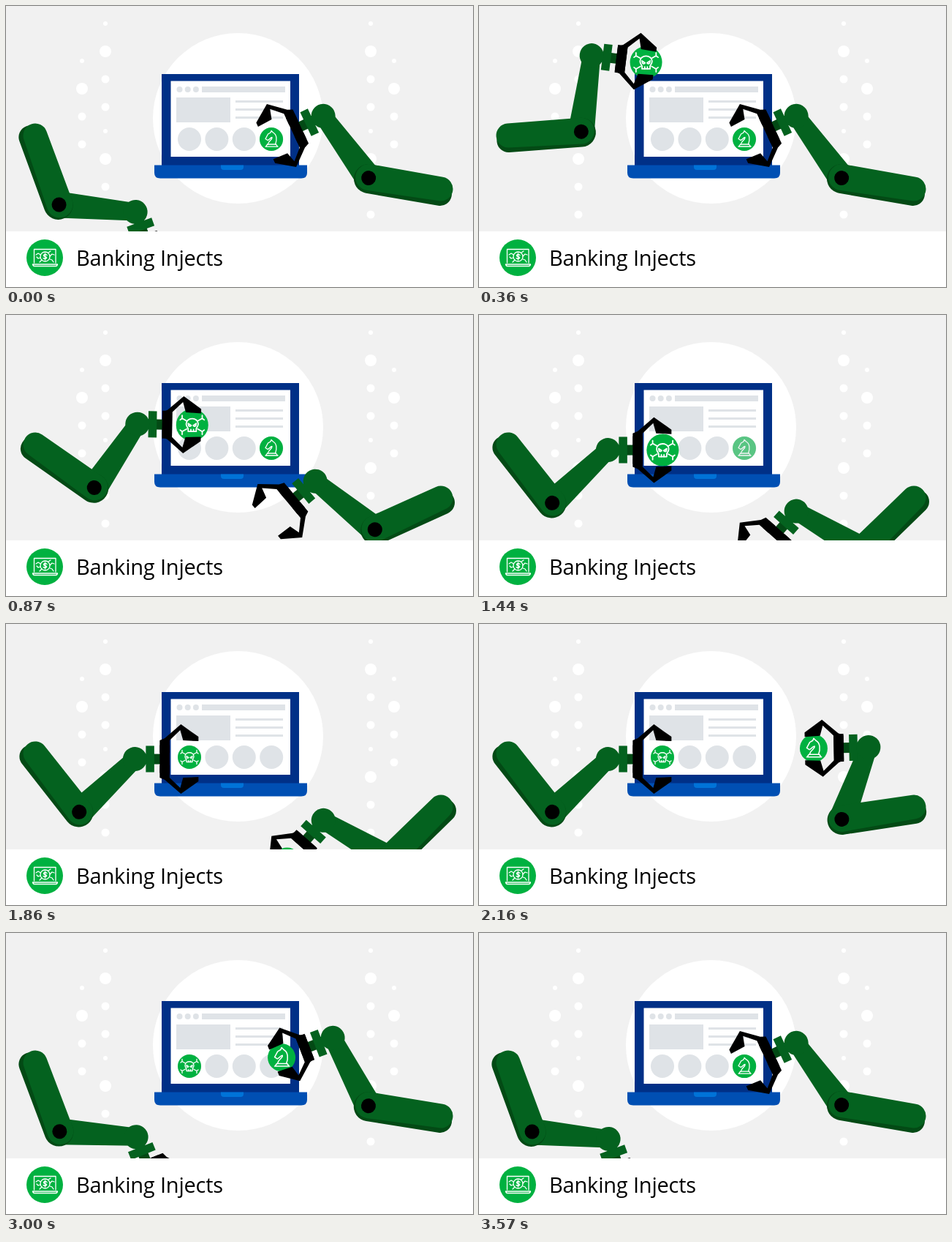
An HTML page for the animation above (3.6 s loop, 639x384 px).

```html
<!DOCTYPE html>
<html lang="en">
<head>
<meta charset="utf-8">
<title>Banking Injects</title>
<style>
  html, body { margin: 0; width: 100%; height: 100%; overflow: hidden; background: #fff; }
  svg { display: block; width: 639px; height: 384px; }
  .line { fill: none; stroke: #fff; stroke-width: 1.3; stroke-linecap: round; stroke-linejoin: round; }
  .label { font: 400 29px "Open Sans", "Noto Sans", sans-serif; font-stretch: 87.5%; letter-spacing: -.2px; }
</style>
</head>
<body>
<svg viewBox="0 0 639 384">
  <rect width="639" height="308" fill="#f1f1f1"/>
  <g id="dots" fill="#fff"></g>
  <circle cx="317.5" cy="153.5" r="116.5" fill="#fff"/>

  <rect x="213" y="93" width="188" height="125" fill="#003087"/>
  <rect x="225.5" y="102.5" width="163.5" height="103.5" fill="#fff"/>
  <path d="M203 217.5H412V228Q412 235.5 404 235.5H211Q203 235.5 203 228Z" fill="#004fb3"/>
  <path d="M294 217.5H325V220Q325 224 321 224H298Q294 224 294 220Z" fill="#0073d8"/>
  <g id="page" fill="#dfe3e7">
    <rect x="268" y="110" width="114" height="8"/>
    <rect x="233" y="125" width="74" height="34"/>
  </g>

  <g id="skull">
    <circle r="16" fill="#00b140"/>
    <g class="line">
      <path d="M-6 -1C-6 -8 6 -8 6 -1C6 2 4 2.5 4 4V6.5H-4V4C-4 2.5 -6 2 -6 -1Z"/>
      <path d="M-4 -1.5L-1 .5Q-2 2 -3.5 1ZM4 -1.5L1 .5Q2 2 3.5 1ZM-1.3 4.5V6.5M1.3 4.5V6.5"/>
      <g id="bones"></g>
    </g>
  </g>
  <g id="knight">
    <circle r="16" fill="#00b140"/>
    <g class="line">
      <path d="M-8 10H9M-5.5 7H6.5L8.5 10M-5.5 7L-7.500 10"/>
      <path d="M-4.5 7C-4.500 2.500 1.500 1 1 -2.500C-1.500 -2.500 -2.500 1 -5 1.500L-8 -.5L-4.5 -7L-1 -9L0 -11.500L2.500 -9C7.500 -6.500 8 1 5.500 7"/>
    </g>
  </g>

  <g id="arms"></g>

  <rect y="308" width="639" height="76" fill="#fff"/>
  <circle cx="53" cy="344" r="25" fill="#00b140"/>
  <g class="line">
    <path d="M38.5 351V332.500H68V351M36.500 353H70.500Q70 355.500 68 355.500H39Q37 355.500 36.500 353Z"/>
    <circle cx="53.500" cy="342.500" r="6.500"/>
    <path d="M56 340.500Q53.500 338.500 51.500 340.500Q51 342 53.500 342.500Q56 343 55.500 344.500Q53.500 346.500 51 344.500M53.500 338V347"/>
    <path d="M47.500 340L44 338L41 340M47 344L44 345L42 343M49 347L46 350M58 337L61 335M60 342L63 339L66 340M60 346L63 347L65 350"/>
  </g>
  <text class="label" x="96" y="355">Banking Injects</text>
</svg>

<script>
const LOOP = 3600, UPPER = 100, FORE = 105, GRIP = 75;
const GREEN = '#04621f', SHADE = '#034a15';
const SLOT_Y = 182, SLOT_R = 16, OPEN = 8.5;

const $ = id => document.getElementById(id);
const rad = deg => deg * Math.PI / 180;
const mix = (a, b, k) => a + (b - a) * k;
const wrap = t => (t + LOOP) % LOOP;
const ramp = (t, a, b) => Math.min(1, Math.max(0, (t - a) / (b - a)));

// Cubic bezier easing (.25, 0, .08, 1), solved by bisection
function ease(p) {
  if (p <= 0 || p >= 1) return p;
  let lo = 0, hi = 1, s = .5;
  for (let i = 0; i < 22; i++) {
    s = (lo + hi) / 2;
    const u = 1 - s;
    if (3 * u * u * s * .25 + 3 * u * s * s * .08 + s * s * s < p) lo = s; else hi = s;
  }
  return s * s * (3 - 2 * s);
}
const glide = (t, a, b) => ease(ramp(t, a, b));

function add(parent, tag, attrs) {
  const el = document.createElementNS('http://www.w3.org/2000/svg', tag);
  for (const k in attrs) el.setAttribute(k, attrs[k]);
  return parent.appendChild(el);
}

// Outline around two circles
function capsule(x1, y1, r1, x2, y2, r2) {
  const a = Math.atan2(y2 - y1, x2 - x1);
  const b = Math.acos((r1 - r2) / Math.hypot(x2 - x1, y2 - y1));
  const at = (x, y, r, q) => `${x + r * Math.cos(q)} ${y + r * Math.sin(q)}`;
  return `M${at(x1, y1, r1, a + b)}A${r1} ${r1} 0 ${+(r1 > r2)} 1 ${at(x1, y1, r1, a - b)}` +
    `L${at(x2, y2, r2, a - b)}A${r2} ${r2} 0 ${+(r2 > r1)} 1 ${at(x2, y2, r2, a + b)}Z`;
}

// An arm that drops its badge into a slot at time `drop`, then fetches a new one
function makeArm({ x, y, side, moves, badge, size, slot, drop }) {
  const root = add($('arms'), 'g', { transform: `translate(${x} ${y}) scale(${side} 1)` });
  const upper = add(root, 'g');
  const fore = add(upper, 'g');
  add(fore, 'path', { d: capsule(0, 0, 18, FORE, 0, 12), fill: GREEN });
  const hand = add(fore, 'g');
  add(hand, 'path', { d: 'M24 -7H36V7H24Z', fill: SHADE });
  add(hand, 'path', { d: 'M10 -7H18V7H10ZM15 -18H26.5V18H15Z', fill: GREEN });
  add(hand, 'path', { d: 'M34 -19H47.5V19H34Z' });
  const fingers = [1, -1].map(flip => add(add(hand, 'g', { transform: `scale(1 ${flip})` }), 'path', {
    d: 'M34 0V-17L41 -20L63 -39L87 -22V-16L66 -17L62 -31L47.5 -17V0Z'
  }));
  add(fore, 'circle', { cx: FORE, r: 16.5, fill: GREEN });
  add(upper, 'path', { d: capsule(0, 7, 16, UPPER, 1, 20), fill: SHADE });
  add(upper, 'path', { d: capsule(0, 0, 16.5, UPPER, -1, 18), fill: GREEN });
  add(upper, 'circle', { cx: UPPER, r: 10 });

  return t => {
    const [a, b, c] = moves.reduce(
      (pose, { from, to, pose: next }) => pose.map((v, i) => mix(v, next[i], glide(t, from, to))),
      moves[moves.length - 1].pose);
    upper.setAttribute('transform', `rotate(${a})`);
    fore.setAttribute('transform', `translate(${UPPER} 0) rotate(${b - a})`);
    hand.setAttribute('transform', `translate(${FORE} 0) rotate(${c - b})`);

    const loose = wrap(t - drop + 140);
    const open = OPEN * (glide(loose, 0, 400) - glide(loose, 1940, 2140));
    fingers.forEach(f => f.setAttribute('transform', `translate(0 ${-open})`));

    const age = wrap(t - drop), stored = age < 2000;
    const k = stored ? glide(age, 0, 450) : 0;
    const reach = fn => UPPER * fn(rad(a)) + FORE * fn(rad(b)) + GRIP * fn(rad(c));
    const bx = mix(x + side * reach(Math.cos), slot, k);
    const by = mix(y + reach(Math.sin), SLOT_Y, k);
    badge.setAttribute('transform', `translate(${bx} ${by}) scale(${mix(size, SLOT_R, k) / SLOT_R})`);
    badge.setAttribute('opacity', stored ? 1 - ramp(age, 1680, 1980) : 1);
  };
}

// Poses hold the angles of upper arm, forearm and hand
const arms = [
  makeArm({
    x: 40, y: 177, side: 1, badge: $('skull'), size: 22, slot: 251, drop: 1440,
    moves: [
      { from: 0, to: 555, pose: [-8, -88, 3] },
      { from: 555, to: 1400, pose: [53, -43.5, 0] },
      { from: 2190, to: 3260, pose: [71, 5.4, 70] }
    ]
  }),
  makeArm({
    x: 595, y: 250, side: -1, badge: $('knight'), size: 19, slot: 363, drop: 3240,
    moves: [
      { from: 580, to: 1510, pose: [45.5, -30.3, 48.5] },
      { from: 1940, to: 2490, pose: [-1.7, -135.9, -14] },
      { from: 2490, to: 3390, pose: [-8.6, -53.8, 25] }
    ]
  })
];

// Background dots: mirrored runs of four
const radii = [3, 8, 5.5, 5.5];
for (const side of [-1, 1])
  for (const [dx, top] of [[181.5, 24], [181.5, 171], [213.5, 75]])
    radii.forEach((r, i) => add($('dots'), 'circle', { cx: 317.5 + side * dx, cy: top + 38 * i, r }));

for (let i = 0; i < 4; i++) {
  add($('page'), 'circle', { cx: 251 + 37.4 * i, cy: SLOT_Y, r: SLOT_R });
  add($('bones'), 'path', {
    d: 'M5.5 4L10 6.5M12 5L10 6.5V9.5',
    transform: `scale(${i % 2 ? 1 : -1} ${i < 2 ? 1 : -1})`
  });
}
for (let i = 0; i < 3; i++) {
  add($('page'), 'circle', { cx: 237.5 + 11.2 * i, cy: 114, r: 4 });
  add($('page'), 'rect', { x: 314, y: 129 + 11 * i, width: 65, height: 3 });
}

const start = performance.now();
function tick(now) {
  const t = Math.max(0, now - start) % LOOP;
  arms.forEach(pose => pose(t));
  requestAnimationFrame(tick);
}
tick(start);
</script>
</body>
</html>
```
